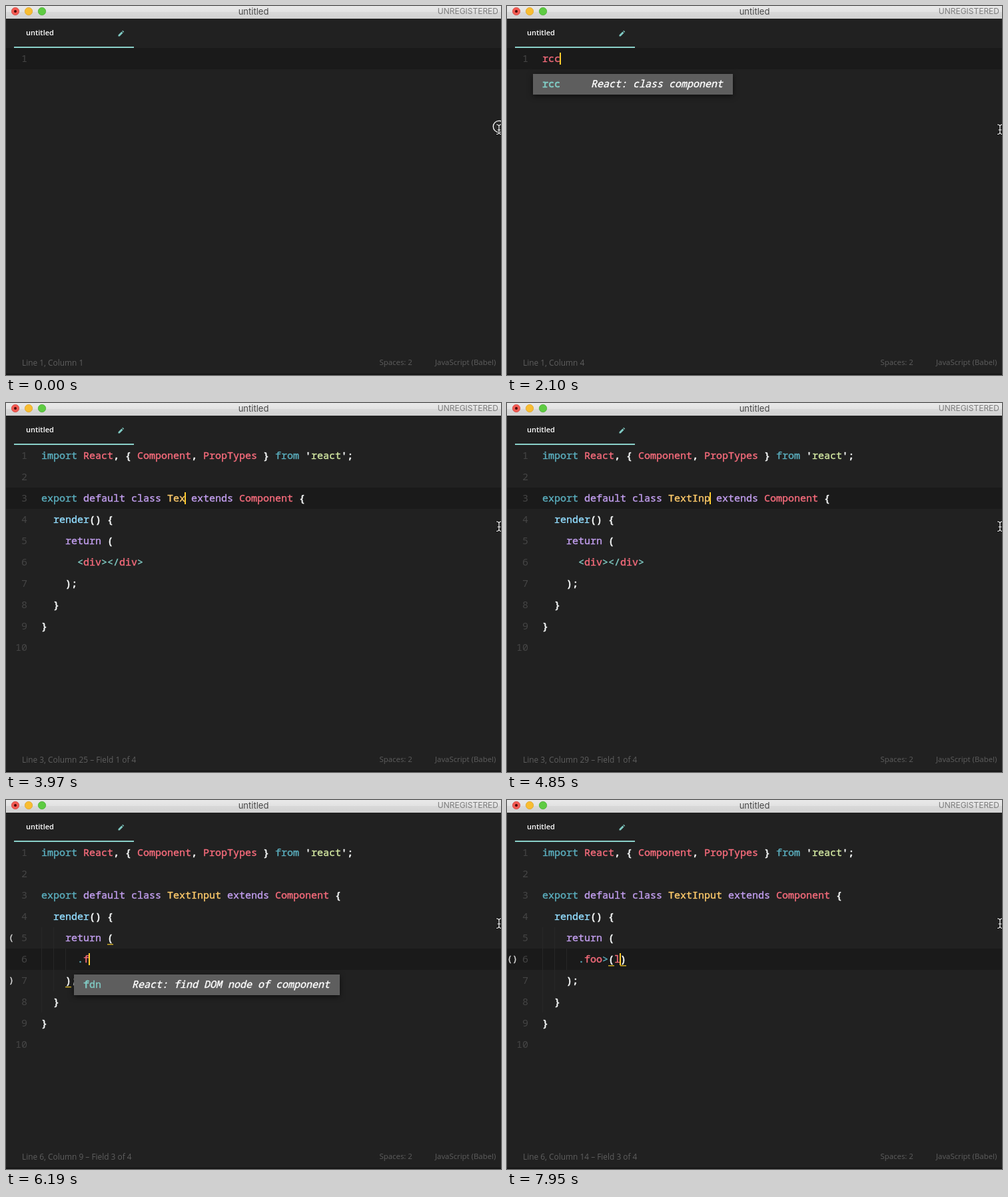
Write an HTML page that moves like this. It is 743 px wide and 554 px high and loops after 8 s.

```html
<!DOCTYPE html>
<html lang="en">
<head>
<meta charset="utf-8">
<title>Snippet demo</title>
<style>
  html, body { margin: 0; width: 100%; height: 100%; overflow: hidden; background: #212121; }
  svg { display: block; }
  text { white-space: pre; }
  .mono { font: 500 15px "Noto Sans Mono", monospace; stroke: var(--ink); fill: var(--ink); stroke-width: .4px; }
  .ui { font: 11.4px "Open Sans", sans-serif; fill: #5e5e5e; }
  .title { font-family: Inter, sans-serif; }
  .tab { font: 600 11px "Open Sans", sans-serif; fill: #fff; }
  .num { --ink: #454545; stroke: none; text-anchor: end; }
  .gutter { --ink: #d8d8d8; font-size: 13px; text-anchor: middle; }
  .t { --ink: #5bafbf; }
  .r { --ink: #f76c7c; }
  .p { --ink: #c39ff0; }
  .y { --ink: #ffcb6b; }
  .b { --ink: #92ddff; }
  .s { --ink: #d3e8a2; }
  .a { --ink: #80cbc4; }
  .w { --ink: #f4f6f6; stroke-width: .7px; }
  .hit { stroke-width: .8px; }
  .desc { --ink: #fff; font-style: italic; }
  .popup { fill: #5e5e5e; filter: drop-shadow(0 2px 4px #0009); }
</style>
</head>
<body>
<svg width="743" height="554" viewBox="0 0 743 554">
  <defs>
    <linearGradient id="bar" x2="0" y2="1">
      <stop offset="0" stop-color="#e9e9e9"/><stop offset=".45" stop-color="#e2e2e2"/>
      <stop offset=".5" stop-color="#d8d8d8"/><stop offset="1" stop-color="#d2d2d2"/>
    </linearGradient>
    <path id="beam" d="M736.5 178q3 0 3.5 2.5V190q-.5 2.500-3.500 2.500M743.500 178q-3 0-3.500 2.500M743.500 192.500q-3 0-3.500-2.500M738 186h4"/>
  </defs>
  <rect width="743" height="554" fill="#212121"/>
  <rect width="743" height="19" fill="url(#bar)"/>
  <g stroke-width=".7">
    <circle cx="14" cy="8" r="5.700" fill="#f25a52" stroke="#d2433c"/>
    <circle cx="34" cy="8" r="5.700" fill="#f8bd32" stroke="#dba023"/>
    <circle cx="54" cy="8" r="5.700" fill="#5ecb42" stroke="#43aa2c"/>
    <circle cx="14" cy="8" r="2" fill="#4a0605"/>
  </g>
  <text class="title" x="371.500" y="13" text-anchor="middle" font-size="13" fill="#474747">untitled</text>
  <text class="title" x="739" y="12" text-anchor="end" font-size="12" fill="#7b7b7b">UNREGISTERED</text>
  <text class="tab" x="30" y="44">untitled</text>
  <path d="M168.500 45.500v-2l5-5 2 2-5 5zM174.200 37.800l1-1 2 2-1 1z" fill="#80cbc4"/>
  <rect x="12" y="61" width="180" height="2" fill="#8ad0c9"/>
  <g id="editor"></g>
  <rect id="caret" width="2" height="18" fill="#ffcc2e"/>
  <g id="overlay"></g>
  <text class="ui" id="status" x="24" y="540" style="font-size:11.9px"></text>
  <text class="ui" x="560.500" y="539">Spaces: 2</text>
  <text class="ui" x="644" y="539">JavaScript (Babel)</text>
  <rect y="552" width="743" height="2" fill="#151515"/>
  <circle id="click" cx="740" cy="181" r="8.700" fill="#2b2b2b" stroke="#fff" stroke-width="1.300"/>
  <g fill="none" stroke-linecap="round">
    <use href="#beam" stroke="#111" stroke-width="3"/>
    <use href="#beam" stroke="#fff" stroke-width="1.200"/>
  </g>
</svg>
<script>
const $ = id => document.getElementById(id);
const LOOP = 8000, LEFT = 53, CHAR = 9, ROW = 32;
const colX = col => LEFT + col * CHAR;
const rowY = row => 63 + (row - 1) * ROW;
const esc = s => s.replace(/&/g, '&amp;').replace(/</g, '&lt;');

// Lines alternate colour class and text, separated by "~".
const DIV = 'a~<~r~div~a~></~r~div~a~>';
const snippet = (name, body = DIV) => [
  "t~import~r~ React~w~, { ~r~Component~w~, ~r~PropTypes~w~ } ~t~from~w~ '~s~react~w~';",
  '',
  `t~export~p~ default class ~y~${name}~p~ extends ~r~Component~w~ {`,
  'b~  render~w~() {',
  'p~    return~w~ (',
  'w~      ~' + body,
  'w~    );',
  'w~  }',
  'w~}',
  ''
];

// Marks are [row, col]; selections are [row, from, to]; gutter entries are [row, text].
const states = [];
const at = (t, change) => states.push({ ...states.at(-1), t, ...change });
const place = (row, col, field) => ({
  row, col, status: `Line ${row}, Column ${col + 1}` + (field ? ` – Field ${field} of 4` : '')
});

at(0, { code: [''], sel: [], marks: [], gutter: [], guides: false, popup: null, ...place(1, 0) });

const rcc = hits => ({ row: 1, col: 0, width: 300, key: 'rcc', hits, desc: 'React: class component' });
at(1660, { code: ['r~r'], ...place(1, 1) });
at(1750, { popup: rcc(1) });
at(2020, { code: ['r~rc'], popup: rcc(2), ...place(1, 2) });
at(2100, { code: ['r~rcc'], popup: rcc(3), ...place(1, 3) });

at(2370, {
  code: snippet('ComponentName'), popup: null, sel: [[3, 21, 34]],
  row: 3, col: 34, status: '13 characters selected – Field 1 of 4'
});
[3520, 3790, 3970, 4150, 4500, 4770, 4850, 5030, 5210].forEach((t, i) =>
  at(t, { code: snippet('TextInput'.slice(0, i + 1)), sel: [], ...place(3, 22 + i, 1) }));

at(5390, {
  sel: [[5, 4, 12.5], [6, 0, 17.5], [7, 0, 6]], row: 7, col: 6, guides: true,
  marks: [[4, 11], [8, 2]], gutter: [[4, '{'], [8, '}']],
  status: '3 lines, 33 characters selected – Field 2 of 4'
});
at(5570, {
  sel: [[6, 6, 17]], row: 6, col: 17,
  marks: [[5, 11], [7, 4]], gutter: [[5, '('], [7, ')']],
  status: '11 characters selected – Field 3 of 4'
});

const typed = (body, col) => ({ code: snippet('TextInput', body), ...place(6, col, 3) });
at(5740, { sel: [], ...typed('t~.', 7) });
at(6100, typed('t~.~r~f', 8));
at(6190, { popup: { row: 6, col: 7, width: 399, key: 'fdn', hits: 1, desc: 'React: find DOM node of component' } });
at(6280, { popup: null, ...typed('t~.~r~fo', 9) });
at(6360, typed('t~.~r~foo', 10));
at(6720, typed('t~.~r~foo~t~>', 11));
at(7430, { marks: [], ...typed('t~.~r~foo~t~>~w~()', 12) });
at(7610, { marks: [[6, 11], [6, 12]], gutter: [[6, '()']] });
at(7780, { marks: [[6, 11], [6, 13]], ...typed('t~.~r~foo~t~>~w~(~r~l~w~)', 13) });

const rect = (x, y, w, h, fill, rx = 0) =>
  `<rect x="${x}" y="${y}" width="${w}" height="${h}" fill="${fill}" rx="${rx}"/>`;
const text = (cls, x, y, s) => `<text class="mono ${cls}" x="${x}" y="${y}">${esc(s)}</text>`;

function lineText(line, row) {
  const parts = line.split('~');
  let col = 0, out = '';
  for (let i = 0; i + 1 < parts.length; i += 2) {
    out += text(parts[i], colX(col), rowY(row) + 21, parts[i + 1]);
    col += parts[i + 1].length;
  }
  return out;
}

function popupBox({ row, col, width, key, hits, desc }) {
  const x = colX(col), y = rowY(row) + 39;
  return `<rect class="popup" x="${x - 14}" y="${y}" width="${width}" height="31"/>` +
    text('a hit', x, y + 20, key.slice(0, hits)) +
    text('a', x + hits * CHAR, y + 20, key.slice(hits)) +
    text('desc', x + 73, y + 20, desc);
}

function draw(s) {
  let out = rect(0, rowY(s.row), s.sel.length ? 48 : 743, ROW, '#1a1a1a');
  for (const [row, a, b] of s.sel) out += rect(colX(a), rowY(row), (b - a) * CHAR, ROW, '#333', 3);
  if (s.guides) {
    [[5, 4], [5, 3], [6, 1]].forEach(([row, count], i) =>
      out += rect(colX(i * 2), rowY(row), 1, count * ROW, '#272727'));
  }
  s.code.forEach((line, i) => {
    out += text('num', 32, rowY(i + 1) + 21, String(i + 1)) + lineText(line, i + 1);
  });
  for (const [row, col] of s.marks) out += rect(colX(col), rowY(row) + 25, CHAR, 1.5, '#c9a827');
  for (const [row, label] of s.gutter) out += text('gutter', 8, rowY(row) + 20, label);
  $('editor').innerHTML = out;
  $('overlay').innerHTML = s.popup ? popupBox(s.popup) : '';
  $('status').textContent = s.status;
  $('caret').setAttribute('x', colX(s.col) - 1);
  $('caret').setAttribute('y', rowY(s.row) + 7);
}

// Caret fades: [start, direction], four steps each; typing restores it.
const fades = [[180, 1], [700, -1], [1140, 1], [2820, -1], [3250, 1], [7160, -1]];
function caretOpacity(t, since) {
  const fade = fades.findLast(([start]) => start <= t && start >= since);
  if (!fade) return since ? 1 : 0;
  const level = Math.min(4, Math.floor((t - fade[0]) / 83) + 1) / 4;
  return fade[1] > 0 ? level : 1 - level;
}

const begin = performance.now();
let shown;
function tick() {
  const t = Math.max(0, performance.now() - begin) % LOOP;
  const state = states.findLast(s => s.t <= t);
  if (state !== shown) draw(shown = state);
  $('caret').setAttribute('opacity', caretOpacity(t, state.t));
  $('click').setAttribute('opacity', t < 90 ? 1 : 0);
  requestAnimationFrame(tick);
}
tick();
</script>
</body>
</html>
```
